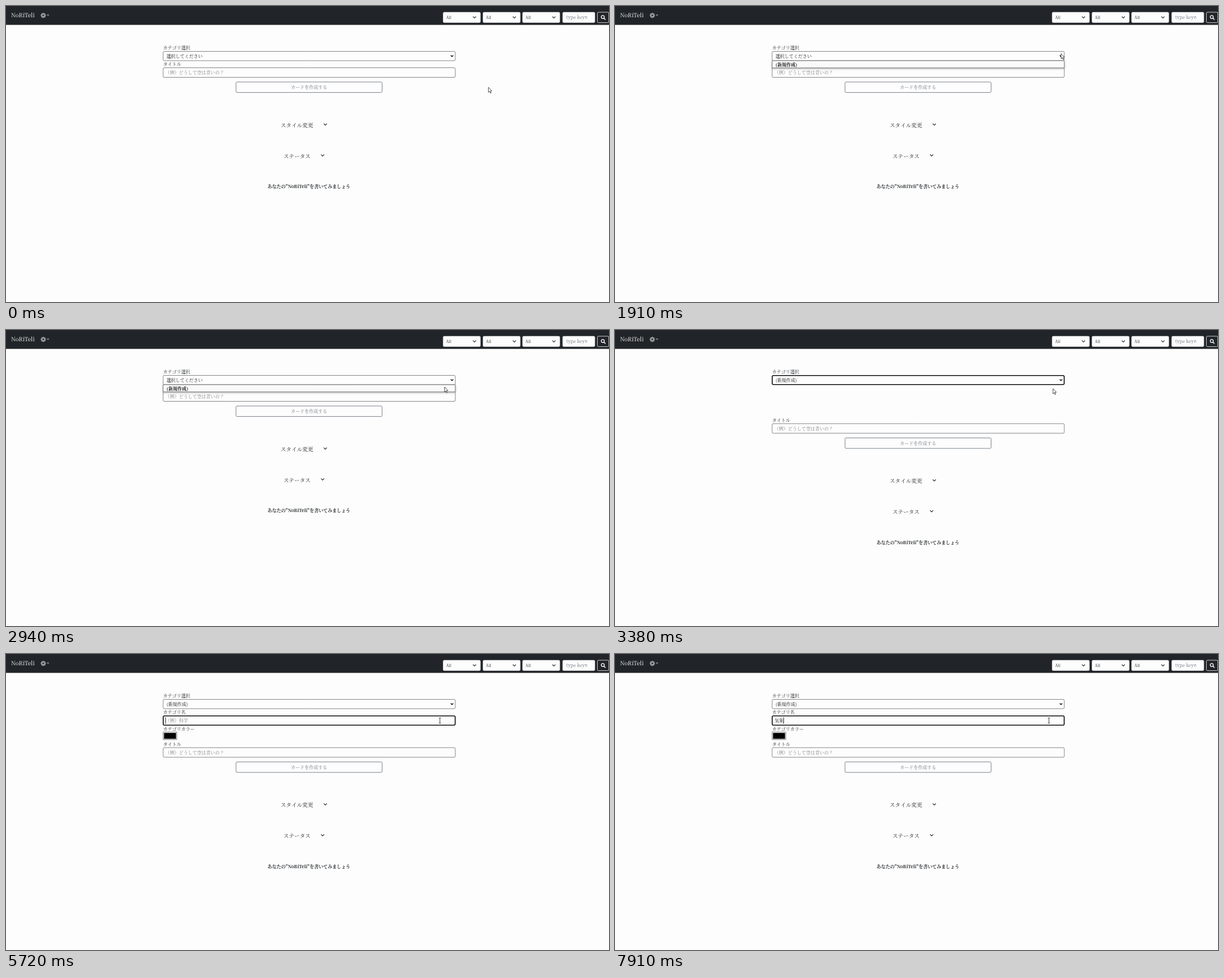
An HTML page with a canvas that plays this animation: 1067 px wide and 525 px high, repeating every 8 s.

```html
<!DOCTYPE html>
<html lang="ja">
<head>
<meta charset="utf-8">
<title>Card form</title>
<style>
html, body { margin: 0; width: 100%; height: 100%; overflow: hidden; background: #fdfdfd; }
canvas { display: block; width: 1067px; height: 525px; }
</style>
</head>
<body>
<canvas id="stage"></canvas>
<script>
const W = 1067, H = 525, LOOP = 8000;
const SERIF = '"Noto Serif CJK JP", "Noto Serif JP", "Noto Serif", "Noto Sans CJK JP", serif';
const SANS = '"Noto Sans CJK JP", "Noto Sans", sans-serif';
const PAPER = '#fdfdfd', DARK = '#212529', GRAY = '#6c757d', LINE = '#767676';
const BRAND = 'NoRiTeli';

const cv = document.getElementById('stage');
const c = cv.getContext('2d');
const dpr = window.devicePixelRatio || 1;
cv.width = W * dpr;
cv.height = H * dpr;

// Text placed by its left edge (or centre) and its vertical middle
function text(s, x, y, o = {}) {
  const size = o.size || 8;
  c.font = `${o.weight || 400} ${size}px ${o.font || SERIF}`;
  c.letterSpacing = (o.gap || 0) + 'px';
  c.textAlign = o.align || 'left';
  c.fillStyle = o.color || DARK;
  c.fillText(s, x, y + size * 0.37);
}

function box(x, y, w, h, fill, stroke, lw = 1, r = 2) {
  c.beginPath();
  c.roundRect(x, y, w, h, r);
  if (fill) { c.fillStyle = fill; c.fill(); }
  if (stroke) { c.strokeStyle = stroke; c.lineWidth = lw; c.stroke(); }
}

function path(points, color, lw) {
  c.beginPath();
  points.forEach(([x, y]) => c.lineTo(x, y));
  c.strokeStyle = color;
  c.lineWidth = lw;
  c.stroke();
}

function chevron(x, y, w, color = DARK, lw = 1.2) {
  path([[x - w / 2, y - w / 4], [x, y + w / 4], [x + w / 2, y - w / 4]], color, lw);
}

function gear(x, y) {
  c.save();
  c.translate(x, y);
  c.fillStyle = '#9b9d9f';
  for (let i = 0; i < 4; i++) {
    c.fillRect(-1.2, -4.5, 2.4, 9);
    c.rotate(Math.PI / 4);
  }
  c.beginPath();
  c.arc(0, 0, 3.5, 0, 7);
  c.fill();
  c.fillStyle = DARK;
  c.beginPath();
  c.arc(0, 0, 1.4, 0, 7);
  c.fill();
  c.restore();
}

function navbar() {
  c.fillStyle = DARK;
  c.fillRect(0, 0, W, 33.5);
  text(BRAND, 9, 16.5, { size: 10, color: '#fff' });
  gear(66, 16.7);
  c.fillStyle = '#9b9d9f';
  c.beginPath();
  c.moveTo(72, 15.3);
  c.lineTo(76.6, 15.3);
  c.lineTo(74.3, 17.7);
  c.fill();
  for (const x of [773.5, 844, 914]) {
    box(x, 11, 66, 18.5, PAPER, '#ced4da', 0.6);
    text('All', x + 5, 20, { size: 7 });
    chevron(x + 55.5, 20, 5.4);
  }
  box(985, 11, 57, 18.5, PAPER, '#ced4da', 0.6);
  c.save();
  c.beginPath();
  c.rect(991, 11, 37.5, 18);
  c.clip();
  text('type keyword', 991.5, 20.3, { color: GRAY });
  c.restore();
  box(1046.5, 11, 20.2, 18.5, null, '#f8f9fa', 0.8);
  c.beginPath();
  c.arc(1056, 19.5, 2.7, 0, 7);
  c.strokeStyle = '#fff';
  c.lineWidth = 1.3;
  c.stroke();
  path([[1058, 21.5], [1060.7, 24.2]], '#fff', 1.5);
}

function field(y, h, focus) {
  if (focus) box(278.25, y + 0.25, 516.5, h - 0.5, PAPER, '#0a0a0a', 1.6);
  else box(278, y, 517, h, PAPER, LINE, 0.9);
}

function selectBox(label, focus) {
  text('カテゴリ選択', 278, 74);
  field(80.5, 16.5, focus);
  text(label, 284, 89, { color: '#111' });
  chevron(789.2, 88.6, 4.4, '#111', 1.4);
}

// Everything that slides down when a new category is made
function lowerForm(dy) {
  c.save();
  c.translate(0, dy);
  text('タイトル', 278, 103.5);
  field(109.5, 17);
  text('（例）どうして空は青いの？', 282, 118, { color: LINE });
  box(407, 134.8, 258.5, 18.6, null, GRAY, 0.9);
  text('カードを作成する', 536.2, 144.2, { color: GRAY, align: 'center' });
  text('スタイル変更', 486, 211.3, { size: 9.6 });
  chevron(565, 210, 5.6);
  text('ステータス', 491, 266.3, { size: 9.6 });
  chevron(560.3, 264.7, 5.6);
  text(`あなたの"${BRAND}"を書いてみましょう`, 536, 320.5, { weight: 600, align: 'center' });
  c.restore();
}

function menu(alpha) {
  c.save();
  c.globalAlpha = alpha;
  c.save();
  c.shadowColor = 'rgba(0,0,0,.35)';
  c.shadowBlur = 4 * dpr;
  c.shadowOffsetY = 1.5 * dpr;
  box(278, 97, 517, 12.8, '#fafafa', null, 0, 0);
  c.restore();
  box(278, 97, 517, 12.8, '#fafafa', '#666', 0.9, 0);
  text('(新規作成)', 284, 103.6, { weight: 700, color: '#111' });
  c.restore();
}

function categoryFields(t) {
  const focus = t >= 4700;
  c.save();
  c.globalAlpha = Math.min(1, Math.max(0, Math.floor((t - 3380) / 147) / 7));
  text('カテゴリ名', 278, 103.5);
  field(109.5, 17, focus);
  text('カテゴリカラー', 278, 133);
  box(278, 138.4, 24.3, 13.4, '#efefef', LINE, 0.9, 0);
  box(279.6, 140, 21.2, 10.4, '#000', null, 0, 0);
  const typed = t < 6310 ? '' : t < 6450 ? 'ｋ' : t < 6890 ? 'き' : '気象';
  if (typed) text(typed, 282.3, 118, { color: '#111' });
  else text('（例）科学', 282, 118, { color: LINE });
  c.restore();

  if (typed && t < 7760) {
    path([[282.5, 123], [282.3 + 8 * typed.length, 123]], '#333', 0.5);
  }
  if (focus && (t < 5150 || t >= 5720)) {
    c.fillStyle = '#000';
    c.fillRect(282.2 + 8 * typed.length, 112.3, 0.8, 11.4);
  }
}

function suggestions(picked) {
  box(274.5, 124.3, 142.7, 107, '#fff', '#999', 0.9, 0);
  if (picked) box(275.5, 126, 140.7, 14.5, '#e8e8e8', null, 0, 0);
  const o = { size: 8.5, font: SANS, color: '#111' };
  ['気象', '希少', '九州', '今日'].forEach((s, i) => text(s, 282, 133.3 + i * 15.7, o));
  text('キャンペーン', 281.5, 196.2, { ...o, gap: -1.8 });
  path([[397, 130.2], [401.6, 134.8]], '#222', 0.9);
  path([[401.6, 130.2], [397, 134.8]], '#222', 0.9);
  c.beginPath();
  c.arc(410.6, 131.2, 1.9, 0, 7);
  c.stroke();
  path([[409.2, 132.7], [406.3, 135.5]], '#222', 0.9);
  chevron(346, 211.3, 8, '#222', 0.9);
  box(275, 219.8, 141.7, 11, '#f0f0f0', null, 0, 0);
  text('Tab キーで予測候補を選択', 279, 225.2, { size: 7, font: SANS, color: '#111', gap: -0.85 });
}

function arrow(x, y) {
  c.save();
  c.translate(x, y);
  c.beginPath();
  [[0, 0], [0, 9], [2, 7.1], [3.4, 10.4], [4.8, 9.8], [3.4, 6.6], [6, 6.4]]
    .forEach(([a, b]) => c.lineTo(a, b));
  c.closePath();
  c.fillStyle = '#fff';
  c.fill();
  c.strokeStyle = '#222';
  c.lineWidth = 0.8;
  c.stroke();
  c.restore();
}

function ibeam(x, y) {
  path([[x, y - 4.6], [x, y + 4.6]], '#222', 0.9);
  path([[x - 2.2, y - 4.7], [x + 2.2, y - 4.7]], '#222', 0.7);
  path([[x - 2.2, y + 4.7], [x + 2.2, y + 4.7]], '#222', 0.7);
}

// Progress in n held steps; the first lands at the start time
function steps(t, from, to, n) {
  if (t < from) return 0;
  return Math.min(1, (Math.floor((t - from) / ((to - from) / (n - 1)) + 0.01) + 1) / n);
}

function pointer(t) {
  const mix = (a, b, p) => a + (b - a) * p;
  if (t < 2340) {
    const p = steps(t, 500, 1510, 8), q = 1 - p;
    arrow(q * q * 853.7 + 2 * p * q * 838 + p * p * 789.3,
          q * q * 144.2 + 2 * p * q * 90 + p * p * 84.5);
  } else if (t < 3230) {
    const p = steps(t, 2340, 2940, 5);
    arrow(mix(789.3, 776, p), mix(84.5, 101, p * p));
  } else {
    const p = steps(t, 3530, 4410, 7);
    const x = mix(775, 767, p), y = mix(104, 117, p);
    if (y < 109.5) arrow(x, y);
    else if (t < 5300) ibeam(x, y);
    else ibeam(767.8, 118);
  }
}

function draw(now) {
  const t = now % LOOP;
  const added = t >= 3230;
  c.setTransform(dpr, 0, 0, dpr, 0, 0);
  c.fillStyle = PAPER;
  c.fillRect(0, 0, W, H);
  navbar();
  selectBox(added ? '(新規作成)' : '選択してください', added && t < 4700);
  lowerForm(added ? 56.6 : 0);
  if (added) categoryFields(t);
  else if (t >= 1780) menu(t < 1910 ? 0.6 : 1);
  if (t >= 6590 && t < 7200) suggestions(t >= 6890);
  pointer(t);
}

const start = performance.now();
function tick() {
  draw(performance.now() - start);
  requestAnimationFrame(tick);
}
tick();
</script>
</body>
</html>
```
